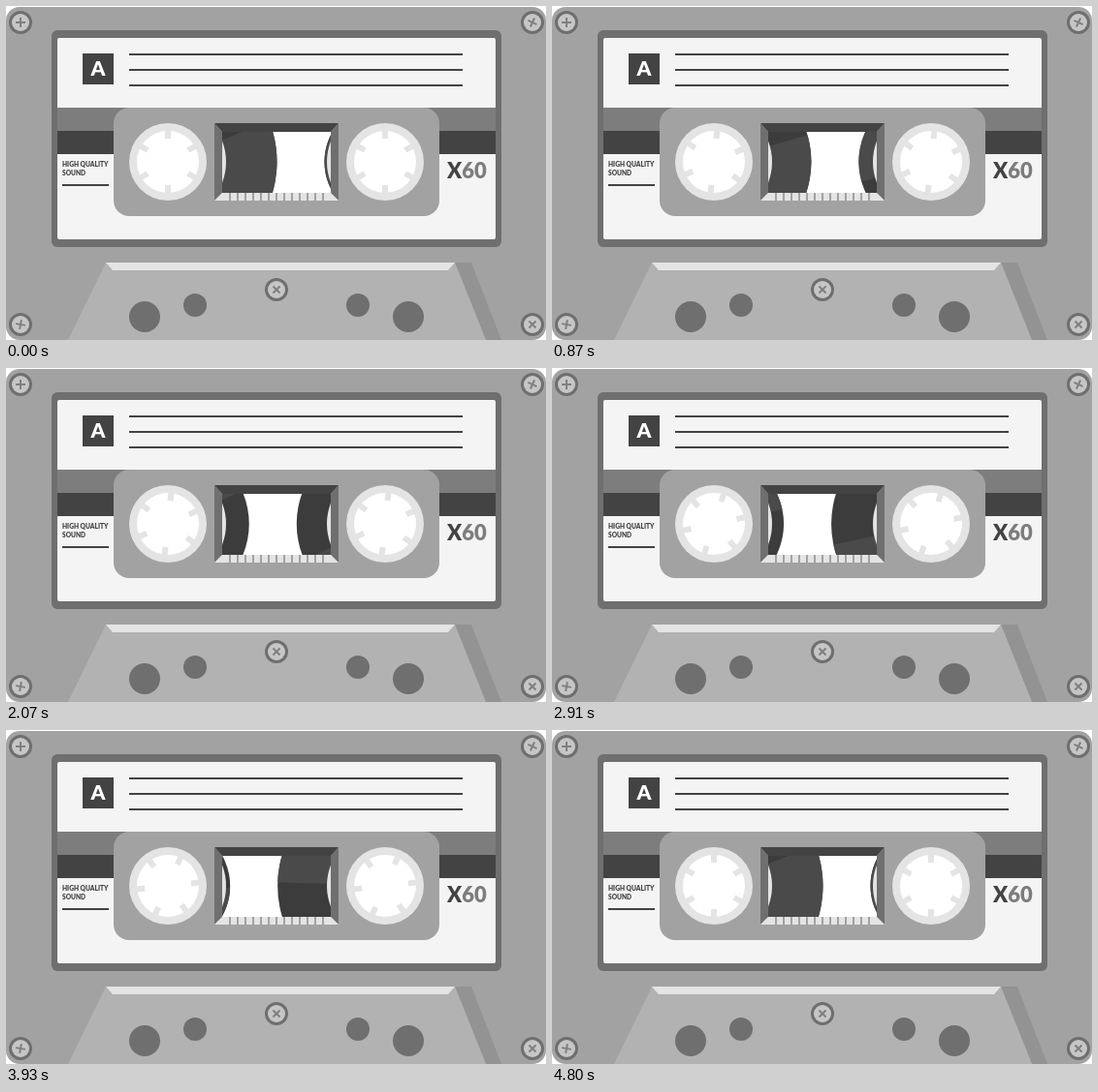
An HTML page with a canvas that plays this animation: 557 by 345 pixels, repeating every 5100 ms.

```html
<!DOCTYPE html>
<html lang="en">
<head>
<meta charset="utf-8">
<title>Cassette</title>
<style>
  html, body { margin: 0; width: 100%; height: 100%; overflow: hidden; background: #fff; }
  canvas { display: block; }
</style>
</head>
<body>
<canvas id="stage" width="557" height="345"></canvas>
<script>
const ctx = document.getElementById('stage').getContext('2d');
const TAU = Math.PI * 2;
const RAD = Math.PI / 180;

const BODY = '#a2a2a2', EDGE = '#6f6f6f', INK = '#434343', MID = '#7d7d7d';
const PAPER = '#f4f4f4', PALE = '#e4e4e4', TAPE = '#3c3c3c', SHEEN = '#4a4a4a';

const LOOP = 5100, STEP = 30, PLAY_END = 3600, REWIND_START = 3900, REWIND_END = 4800;
const REEL_Y = 161, LEFT_X = 167, RIGHT_X = 391;
const TAPE_MIN = 62.5, TAPE_MAX = 112.5, TURNS = 2;

function rect(x, y, w, h, color) {
  ctx.fillStyle = color;
  ctx.fillRect(x, y, w, h);
}

function roundRect(x, y, w, h, r, color) {
  ctx.fillStyle = color;
  ctx.beginPath();
  ctx.roundRect(x, y, w, h, r);
  ctx.fill();
}

function disc(x, y, r, color) {
  ctx.fillStyle = color;
  ctx.beginPath();
  ctx.arc(x, y, r, 0, TAU);
  ctx.fill();
}

function poly(color, ...points) {
  ctx.fillStyle = color;
  ctx.beginPath();
  for (const [x, y] of points) ctx.lineTo(x, y);
  ctx.fill();
}

function text(label, x, y, size, color) {
  ctx.font = `900 ${size}px Lato, sans-serif`;
  ctx.fillStyle = color;
  ctx.fillText(label, x, y);
  return ctx.measureText(label).width;
}

function rotated(x, y, angle, draw) {
  ctx.save();
  ctx.translate(x, y);
  ctx.rotate(angle);
  draw();
  ctx.restore();
}

function screw(x, y, degrees) {
  disc(x, y, 12, EDGE);
  disc(x, y, 9, '#c6c6c6');
  rotated(x, y, degrees * RAD, () => {
    rect(-5, -1, 10, 2, '#808080');
    rect(-1, -5, 2, 10, '#808080');
  });
}

function drawShell() {
  ctx.clearRect(0, 0, 557, 345);
  roundRect(0, 1, 557, 344, 14, BODY);
  screw(15, 17, 0);
  screw(543, 17, 25);
  screw(15, 329, 10);
  screw(543, 329, 45);

  poly('#939393', [463, 265], [480, 265], [511, 345], [495, 345]);
  poly('#b2b2b2', [103, 265], [463, 265], [495, 345], [64, 345]);
  poly(PALE, [103, 265], [463, 265], [456, 273], [110, 273]);
  for (const side of [-1, 1]) {
    disc(279 + side * 136, 321, 16, EDGE);
    disc(279 + side * 84, 309, 12, EDGE);
  }
  screw(279, 293, 45);
}

function drawLabel() {
  roundRect(47, 25, 464, 224, 6, EDGE);
  roundRect(53, 33, 452, 208, 2, PAPER);
  rect(53, 105, 452, 24, MID);
  rect(53, 129, 452, 24, INK);
  rect(79, 49, 32, 32, INK);
  ctx.textAlign = 'center';
  text('A', 95, 72, 21, '#fff');
  ctx.textAlign = 'left';
  for (const y of [49, 65, 81]) rect(127, y, 344, 2, INK);

  text('HIGH QUALITY', 58, 166, 6.6, INK);
  text('SOUND', 58, 175, 6.6, INK);
  rect(58, 184, 48, 2, INK);
  const width = text('X', 455, 178, 22, INK);
  text('60', 455 + width, 178, 22, MID);
  roundRect(111, 105, 336, 112, 16, BODY);
}

function drawSpool(x, radius, angle) {
  disc(x, REEL_Y, radius, TAPE);
  rotated(x, REEL_Y, angle, () => {
    ctx.fillStyle = SHEEN;
    for (const start of [-22, 158]) {
      ctx.beginPath();
      ctx.moveTo(0, 0);
      ctx.arc(0, 0, radius, start * RAD, (start + 52) * RAD);
      ctx.fill();
    }
  });
  disc(x, REEL_Y, 60, PALE);
}

function drawWindow(progress, angle) {
  const wound = (TAPE_MAX - TAPE_MIN) * progress;
  ctx.save();
  ctx.beginPath();
  ctx.rect(223, 130, 112, 63);
  ctx.clip();
  rect(223, 130, 112, 63, '#fff');
  drawSpool(LEFT_X, TAPE_MAX - wound, angle);
  drawSpool(RIGHT_X, TAPE_MIN + wound, angle);
  ctx.restore();

  poly(INK, [215, 121], [343, 121], [335, 130], [223, 130]);
  poly(EDGE, [215, 121], [223, 130], [223, 193], [215, 201]);
  poly(EDGE, [343, 121], [335, 130], [335, 193], [343, 201]);
  poly(PALE, [223, 193], [335, 193], [343, 201], [215, 201]);
  for (let x = 230; x <= 326; x += 8) rect(x, 193, 2, 8, BODY);
}

function drawHub(x, angle) {
  disc(x, REEL_Y, 40, PALE);
  disc(x, REEL_Y, 32, '#fff');
  for (let i = 0; i < 6; i++) {
    rotated(x, REEL_Y, angle + i * TAU / 6, () => rect(-3, -33, 6, 9, PALE));
  }
}

// 0 = all tape on the left spool, 1 = all tape on the right
function progressAt(time) {
  const t = Math.floor(time % LOOP / STEP) * STEP;
  if (t < REWIND_START) return Math.min(t / PLAY_END, 1);
  return Math.max(0, (REWIND_END - t) / (REWIND_END - REWIND_START));
}

let startTime;
function frame(now) {
  startTime ??= now;
  const progress = progressAt(now - startTime);
  const angle = -progress * TURNS * TAU;
  drawShell();
  drawLabel();
  drawWindow(progress, angle);
  drawHub(LEFT_X, angle);
  drawHub(RIGHT_X, angle);
  requestAnimationFrame(frame);
}
requestAnimationFrame(frame);
</script>
</body>
</html>
```
